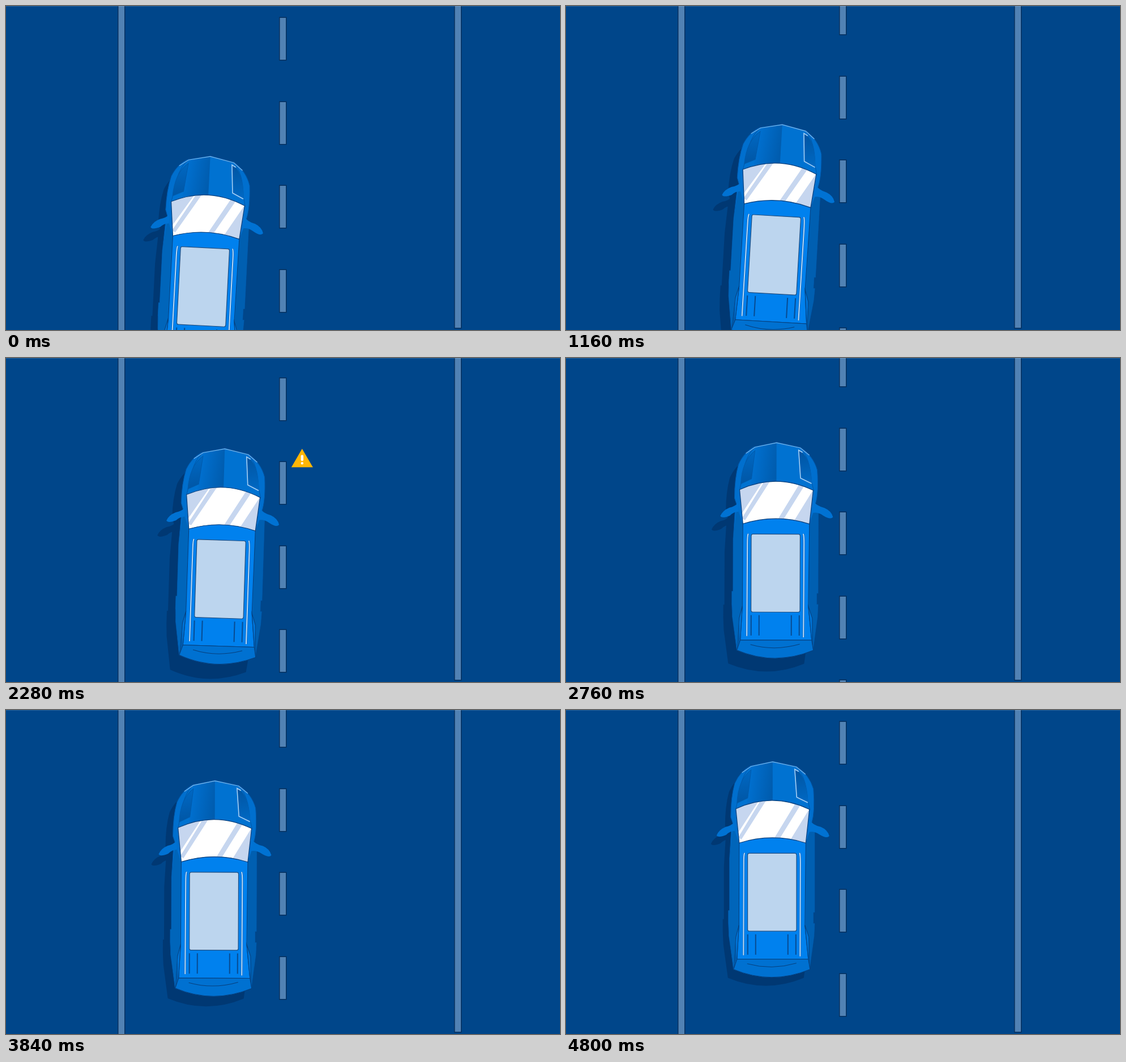
Write an HTML page with a canvas that moves like this. It is 978 px wide and 573 px high and loops after 4840 ms.

```html
<!DOCTYPE html>
<html lang="en">
<head>
<meta charset="utf-8">
<title>Lane keeping</title>
<style>
html, body { margin: 0; width: 100%; height: 100%; overflow: hidden; background: #00468a; }
canvas { display: block; }
</style>
</head>
<body>
<canvas id="stage" width="978" height="573"></canvas>
<script>
const ctx = document.getElementById('stage').getContext('2d');
const LOOP = 4840, STEP = 40;
const DASH_GAP = 148.5, DASH_SPEED = DASH_GAP * 0.3;
const PIVOT = { x: 364, y: 322.5 };
const INK = '#073f7c';

// time, roof centre x, y, heading in degrees, shadow offset x, y
const KEYS = [
  [0, 348, 496.3, 2.9, -13, 23],
  [640, 359, 465.4, 3.1, -15, 25],
  [1160, 367.5, 440, 3.3, -16, 26],
  [2280, 378, 391, 1.8, -16, 26],
  [2880, 368.2, 378, -0.1, -15, 23],
  [3240, 368.1, 369.5, 0.4, -14, 21],
  [3840, 367.1, 355.8, 0.2, -13, 18],
  [4800, 363.8, 322.2, 0, -10, 15]
];

const path = d => new Path2D(d);
const body = path('M365 91 L326 99 Q308 108 298 130 Q291 155 291 190 L295 202 L292 212 L289 262 V355 H287 V378 L288 400 L296 459 Q363 487 430 459 L438 400 L439 378 H436.5 V358 H439 V212 L434 200 Q440 180 437 140 Q430 115 407 100 Z');
const leftSide = path('M295 205 L306 236 V382 L297 458 L288 400 V378 H287 V355 H289 V262 Z');
const rightSide = path('M434 204 L439 212 V358 H436.5 V378 H439 L438 400 L430 458 L423 382 V236 Z');
const leftMirror = path('M298 198 Q292 205 282 207 Q270 212 266 222 Q269 227 283 221 Q290 214 298 214 Z');
const rightMirror = path('M429 194 Q436 204 450 207 Q462 212 465 223 Q461 229 447 220 Q438 214 429 216 Z');
const hood = path('M365 92 L327 100 Q308 116 303 162 L300 176 Q365 147 431 177 L427 160 Q424 117 407 101 Z');
const hoodLeft = path('M365 92 L327 100 L320 155 L319 168 Q340 161 365 161 Z');
const lampLeft = path('M327 106 L321 156 L302 165 Q304 124 327 106 Z');
const lampRight = path('M404 105 Q424 112 428 165 L407.5 154.5 Z');
const noseEdge = path('M311 111 L327 100 L365 92 L407 101 L423 114');
const lampEdge = path('M411 109 L404 105 L407.5 154.5 L427 164');
const cabin = path('M306 235 Q365 217 423.5 235 L422 382 L428 441 H302 L305.5 382 Z');
const glass = path('M300 175 Q365 145 430 176 L423.5 235.5 Q365 217 306 235.5 Z');
const glassTint = path('M296 170 L340 162 L303 219 Z M345 158 H355 L310 229 L304 226 Z M406 164 L415.5 166 L376 230 L366 230 Z M433 170 L428 240 L395 232 Z');
const fenders = path('M305.5 381 L300 402 L297 457 L302 441 Z M422 381 L429 402 L430 457 L428 441 Z');
const darkFenders = path('M300 402 L297 455 L301 440 Z M429 402 L430 455 L428 440 Z');
const bumper = path('M302 441 H428 L431 459 Q363 487 296 459 Z');
const bumperCrease = path('M320 449 Q363 461 407 448');
const rails = path('M315.5 253 Q314 256 314 270 L313.5 434 M412.5 253 Q414 256 414 270 L413.5 436');
const ribs = path('M321 397 V433 M335 397 V433 M392 397 V433 M406 397 V433');

function gradient(x0, y0, x1, y1, from, to) {
  const g = ctx.createLinearGradient(x0, y0, x1, y1);
  g.addColorStop(0, from);
  g.addColorStop(1, to);
  return g;
}

const hoodShade = gradient(322, 130, 365, 136, '#0070d0', '#005cae');
const lampLeftShade = gradient(310, 112, 318, 164, '#0067c1', '#0056a5');
const lampRightShade = gradient(410, 110, 420, 165, '#0056a5', '#0069c4');

function fill(shape, color, outline) {
  ctx.fillStyle = color;
  ctx.fill(shape);
  if (outline) stroke(shape, outline, 1);
}

function stroke(shape, color, width) {
  ctx.strokeStyle = color;
  ctx.lineWidth = width;
  ctx.stroke(shape);
}

// Cubic Hermite through the keys, tangents taken from the neighbours
function pose(t) {
  const last = KEYS.length - 1;
  let i = 0;
  while (i < last - 1 && t >= KEYS[i + 1][0]) i++;
  const a = KEYS[i], b = KEYS[i + 1];
  const span = b[0] - a[0];
  const u = Math.min(1, (t - a[0]) / span);
  const slope = (k, c) => {
    const p = KEYS[Math.max(0, k - 1)], n = KEYS[Math.min(last, k + 1)];
    return (n[c] - p[c]) / (n[0] - p[0]) * span;
  };
  const at = c => {
    const d = b[c] - a[c], m = slope(i, c), n = slope(i + 1, c);
    return a[c] + u * (m + u * (3 * d - 2 * m - n + u * (m + n - 2 * d)));
  };
  return { x: at(1), y: at(2), angle: at(3) * Math.PI / 180, sx: at(4), sy: at(5) };
}

function marking(x, y, h) {
  ctx.fillStyle = '#06305f';
  ctx.fillRect(x, y, 13.5, h);
  ctx.fillStyle = '#5182b4';
  ctx.fillRect(x + 1.5, y + 1.5, 10.5, h - 3);
}

function drawRoad(frame) {
  ctx.fillStyle = '#00468a';
  ctx.fillRect(0, 0, 978, 573);
  marking(197, -5, 585);
  marking(791, -5, 575.5);
  const shift = (20 + frame * DASH_SPEED) % DASH_GAP;
  for (let y = shift - DASH_GAP; y < 573; y += DASH_GAP) marking(482, Math.round(y) - 0.5, 77);
  ctx.fillStyle = 'rgba(255,255,255,.16)';
  ctx.fillRect(0, 0, 978, 1);
}

function placed(x, y, angle, draw) {
  ctx.save();
  ctx.translate(x, y);
  ctx.rotate(angle);
  ctx.translate(-PIVOT.x, -PIVOT.y);
  draw();
  ctx.restore();
}

function drawShadow() {
  fill(body, '#003873');
  fill(leftMirror, '#003873');
}

function drawCar() {
  fill(body, '#006fce', '#0055a5');
  fill(leftSide, '#0065ba');
  fill(rightSide, '#005fb1');
  fill(leftMirror, '#0072d3');
  fill(rightMirror, '#0072d3');
  fill(hood, '#0072d1', '#0058a9');
  fill(hoodLeft, hoodShade);
  fill(lampLeft, lampLeftShade, '#005bad');
  fill(lampRight, lampRightShade);
  stroke(noseEdge, '#7db9ee', 1.2);
  stroke(lampEdge, '#a9d0f5', 1.6);
  fill(cabin, '#0081ee', INK);
  fill(fenders, '#0073d5', INK);
  fill(darkFenders, '#0057a7');
  fill(bumper, '#0071d1', INK);
  stroke(bumperCrease, INK, 1);

  ctx.save();
  ctx.clip(glass);
  fill(glass, '#fff');
  fill(glassTint, '#c6d6ef');
  ctx.restore();
  stroke(glass, INK, 1.2);

  stroke(rails, '#0a5db0', 3.4);
  stroke(rails, '#b9dbfa', 2);
  stroke(ribs, '#084b91', 2);
  ctx.beginPath();
  ctx.roundRect(320.8, 253.7, 86.4, 137.8, 3);
  ctx.fillStyle = '#bcd5ee';
  ctx.fill();
  ctx.strokeStyle = '#214f82';
  ctx.lineWidth = 1.2;
  ctx.stroke();
}

function drawWarning() {
  fill(path('M522.7 160.5 L541.8 193.3 H503.8 Z'), '#ffb606');
  ctx.fillStyle = '#fff';
  ctx.beginPath();
  ctx.roundRect(520.6, 171.5, 4.4, 10.5, 1.8);
  ctx.roundRect(520.6, 184, 4.4, 4.2, 2);
  ctx.fill();
}

// Four blinks, half on and half off
function warningOn(t) {
  const since = t - 240;
  return since >= 0 && since < 3920 && since % 980 < 490;
}

const start = performance.now();

function render() {
  const frame = Math.floor(((performance.now() - start) % LOOP) / STEP);
  const t = frame * STEP;
  const car = pose(t);
  drawRoad(frame);
  placed(car.x + car.sx, car.y + car.sy, car.angle, drawShadow);
  placed(car.x, car.y, car.angle, drawCar);
  if (warningOn(t)) drawWarning();
  requestAnimationFrame(render);
}
render();
</script>
</body>
</html>
```
